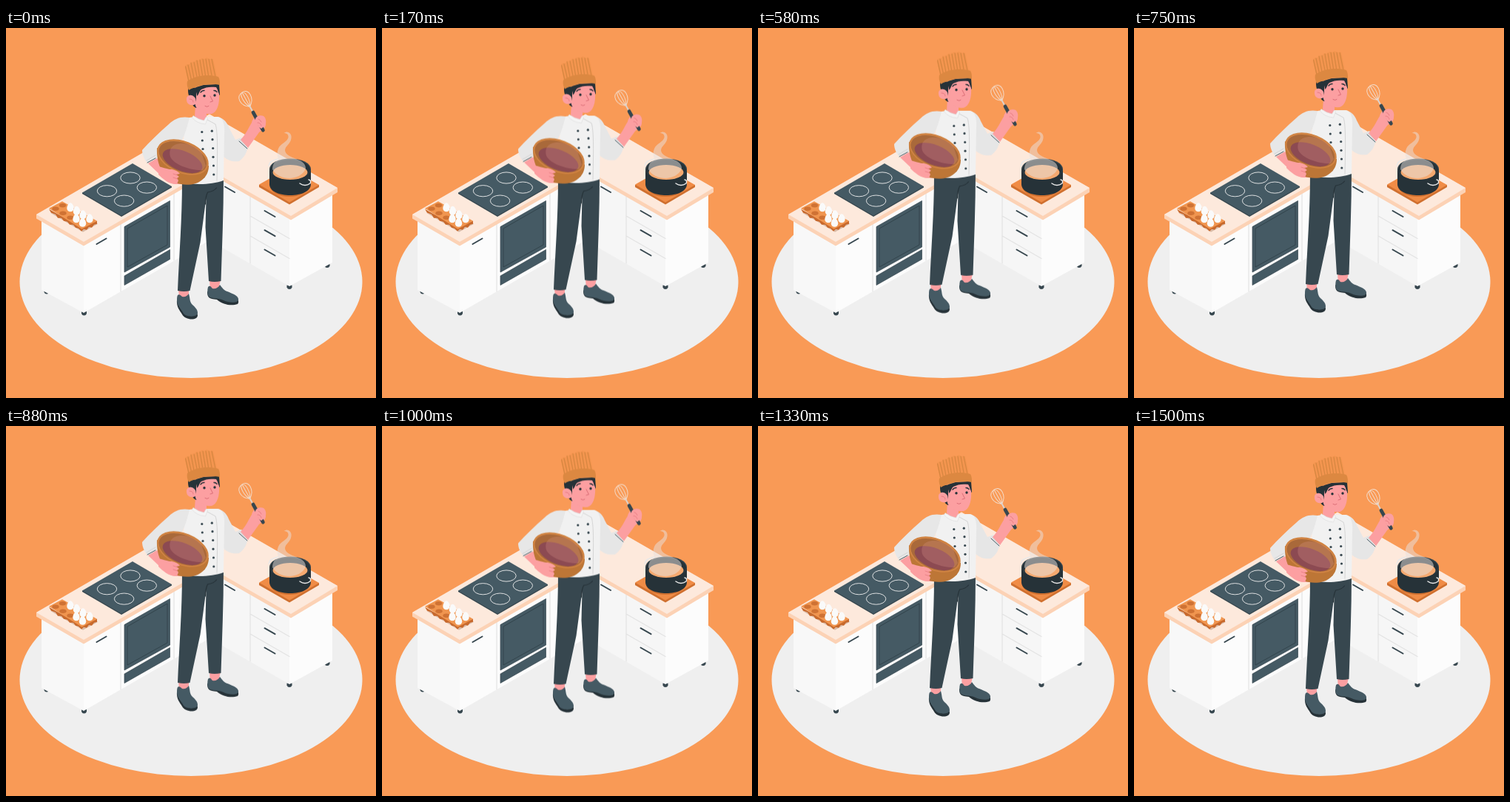
These frames come from a looping animation (500x500 px, 1.54 s). An HTML page without scripts:

```html
<!DOCTYPE html>
<html lang="en">
<head>
<meta charset="utf-8">
<title>Chef in the kitchen</title>
<style>
  html, body { margin: 0; width: 100%; height: 100%; overflow: hidden; background: #f99a56; }
  svg { display: block; width: 100vw; height: 100vh; }
  .line { fill: none; stroke-linecap: round; stroke-linejoin: round; }
  .dark { fill: #263238; }
  .slate { fill: #37474f; }
  .steel { fill: #455a64; }
  .skin { fill: #fc9fa1; }
  .handle { stroke: #37474f; stroke-width: 2; }
  .seam { stroke: #e3e3e3; stroke-width: 1.2; }
  .burner { fill: none; stroke: #f0f0f0; stroke-width: .9; }
  .fold { stroke: #d5d5d5; stroke-width: 1; }
  .chef { animation: bob 770ms cubic-bezier(.37, 0, .63, 1) -40ms infinite alternate; }
  @keyframes bob { to { transform: translateY(-9px); } }
</style>
</head>
<body>
<svg viewBox="0 0 500 500">
  <defs>
    <path id="handle" class="line handle" d="M349.500 247l14 8"/>
    <path id="foot" class="slate" d="M-3.500-2v3q1 2.500 3.500 2.500t3.500-2.500v-3z"/>
    <path id="egg" d="M0-6.500c2.500 0 4.700 4.500 4.700 7.500a4.700 4.500 0 0 1-9.400 0c0-3 2.200-7.500 4.700-7.500z" fill="#fafafa"/>
    <ellipse id="cup" rx="4.600" ry="2.700" fill="#cf7234"/>
    <ellipse id="burner" class="burner" rx="13.200" ry="7.600"/>
    <circle id="button" r="1.600" class="slate"/>
  </defs>

  <rect width="500" height="500" fill="#f99a56"/>
  <ellipse cx="250" cy="343" rx="231.500" ry="130" fill="#efefef"/>

  <g id="counters">
    <use href="#foot" x="55" y="356"/>
    <use href="#foot" x="105.500" y="385"/>
    <use href="#foot" x="383" y="349.500"/>
    <use href="#foot" x="434" y="320.500"/>

    <path d="M48 258l57 33v94l-57-31z" fill="#f8f8f8"/>
    <path d="M105 291l170-98v94l-170 98z" fill="#fcfcfc"/>
    <path d="M275 193l108 62v94l-108-62z" fill="#f6f6f6"/>
    <path d="M383 255l58-34v96l-58 32z" fill="#fcfcfc"/>

    <path class="line seam" d="M155 265v91M227 223v91M330 228v90M330 254l53 30.500M330 281l53 30.500"/>

    <g transform="translate(0 1)">
      <path d="M41 251L275 115.500 448 215v6L385 258.500 275 195.500 105 293.500 41 256.500z" fill="#fcd2b5"/>
      <path d="M41 251L275 115.500 448 215 385 253 275 190 105 288z" fill="#fde9dc"/>
    </g>

    <path class="line handle" d="M122.500 292l13-7.500M296 214.500l13 7.500"/>
    <use href="#handle"/>
    <use href="#handle" y="26.200"/>
    <use href="#handle" y="52.500"/>

    <g class="steel" stroke="#37474f" stroke-width=".7" stroke-linejoin="round">
      <path d="M160 268.500l61.500-35v62.500l-61.500 34z"/>
      <path d="M164 271l54-31v53l-54 30z" stroke="#2c3b43"/>
      <path d="M160 335l61.500-35.500v13l-61.500 35z"/>
    </g>
  </g>

  <g id="hob" transform="translate(0 .5)">
    <path class="slate" d="M103 222v1.500l53 31 68-39.500v-1.500z"/>
    <path class="steel" d="M103 222l68-39.500 53 31-68 39.500z"/>
    <use href="#burner" x="168" y="202"/>
    <use href="#burner" x="136.500" y="219.700"/>
    <use href="#burner" x="190.300" y="215.100"/>
    <use href="#burner" x="159.600" y="233.100"/>
  </g>

  <g id="eggs" transform="translate(0 .7)">
    <path d="M60 249l44 26 20-11-4-3z" fill="#d9b9a5"/>
    <path d="M58 244l44 25 21-9v4l-4 1-3 4-4-1-3 4-4-1-3 3-4-4-4-1-3-4-5 0-3-4-5-1-3-4-5 0-3-5-6-2z" fill="#c8692c"/>
    <path d="M58 243l18-9.500 47 26.500-20.500 11z" fill="#f0954f"/>
    <use href="#cup" x="67" y="243.500"/>
    <use href="#cup" x="76.500" y="239"/>
    <use href="#cup" x="77" y="249.500"/>
    <use href="#cup" x="87" y="255.500"/>
    <use href="#egg" x="87" y="242"/>
    <use href="#egg" x="95.500" y="246.500"/>
    <use href="#egg" x="104" y="252"/>
    <use href="#egg" x="113" y="257"/>
    <use href="#egg" x="95" y="257"/>
    <use href="#egg" x="103.500" y="262.500"/>
  </g>

  <g id="pot">
    <path class="line" d="M342 212v3l41 23.500 40-23.500v-3z" style="fill:#d0702f"/>
    <path d="M342 211.500l40-22.500 41 23-40 23.500z" fill="#f08c46"/>
    <ellipse cx="383" cy="214" rx="26" ry="14" fill="#d0702f"/>
    <path class="dark" d="M356 190v21c0 20 56 20 56 0v-21z"/>
    <ellipse cx="384" cy="190.500" rx="28" ry="14" fill="#37474f"/>
    <ellipse cx="384" cy="191" rx="27" ry="13" class="dark"/>
    <ellipse cx="384" cy="195" rx="23.500" ry="10" fill="#f4a970"/>
    <path class="line" d="M355 186q1-7 13-9M397 210q7 5 14 0 2-4-2-5" stroke="#e9e9e9" stroke-width="1.500"/>
    <path d="M375.500 142c5-4 11 0 10 7-1 8-8 10-8.500 16 0 6 8 9 15 12 8 3 13 6 13 13-7 17-36 17-45 1 0-8 4-11 9-13-3-5-3-10-1-15 3-7 12-9 13.500-15 .5-4-2-6-6-6z" fill="#e8e0dc" opacity=".52"/>
  </g>

  <g class="chef">
    <g id="legs">
      <path class="skin" d="M233 352h14l0 14-13-1zM275 340h15l-3 14-11 1z"/>
      <path class="dark" d="M231 367c-1 10 4 15 7 20 4 8 21 9 21 1l-2-6-23-16zM272 356c0 8 2 10 13 11 8 7 20 9 28 6 2-2 1-5 0-7z"/>
      <path class="steel" d="M232 361c2-2 4 0 6 2 4 1 7-1 9-4 2 7 1 10 4 14 4 4 8 7 8 12 0 6-15 6-19 1-3-6-9-11-9-18 0-3 0-5 1-7zM273 350c3-3 4 0 6 2 4 1 8-1 10-5 3 4 6 8 10 9 7 3 14 5 15 10 1 6-12 6-20 2-8-4-19-1-21-7-1-3-1-7 0-11z"/>
      <path class="slate" d="M238 207l56-4c0 45-2 92-3.500 139q-9 2-16.500 0l-4.500-73 1-39-8 60-14 65q-8 2-16.500 0c2-48 6-98 6-148z"/>
      <path class="line" d="M269.500 238c0-8 1-12 3-16 6-1 9-2 12-6" stroke="#263238" stroke-width="1.100"/>
    </g>

    <g id="jacket">
      <path d="M280 120c11-1 18 5 21 14l9 17 8-3 9 10c-1 10-5 17-12 22-8 1-14 0-22-7z" fill="#e6e6e6"/>
      <path d="M241 122l14-2 31 0c8 1 10 12 9 24l-1 62c-16 6-38 6-56 3l2-50z" fill="#f1f1f1"/>
      <path d="M248 121c-11-2-20 1-28 9-14 12-26 24-36 35 0 6 3 13 7 17l14-7 24-12c11-9 16-30 19-42z" fill="#e7e7e7"/>
      <path class="line fold" d="M272 124l11 6c3 9 3 30 2 76M190 179l12-7M316 151l11 10"/>
      <path class="line" d="M191 182l11-6M315 153l11 10" stroke="#455a64" stroke-width="1"/>
      <path class="skin" d="M256 104h15v18l-3 5q-7-1-13-8z"/>
      <path d="M253 118.500q7 5 14.500 6.500l3-5 2 2-3 8q-12-1-18-9z" fill="#f4f4f4" stroke="#dcdcdc" stroke-width=".6"/>
      <use href="#button" x="264.800" y="140.500"/>
      <use href="#button" x="265.300" y="152"/>
      <use href="#button" x="266" y="163.500"/>
      <use href="#button" x="278.300" y="139.200"/>
      <use href="#button" x="279" y="150.700"/>
      <use href="#button" x="279.700" y="162.500"/>
      <use href="#button" x="280" y="174.300"/>
      <use href="#button" x="280.500" y="186"/>
      <use href="#button" x="280.800" y="198"/>
      <use href="#button" x="267" y="201"/>
    </g>

    <g id="head">
      <path class="dark" d="M246 82l42-6 1 14-4 4-28 14c-6-2-6-9-8-14-3-3-3-8-3-12z"/>
      <path class="skin" d="M257 95c0-6 0-9 4-12 9-4 17-5 24-4 1 4 1 7 3 10 1 14-3 25-10 27-8 1-18-3-21-9-2-3-1-8 0-12z"/>
      <path class="skin" d="M256 95c-4-7-13-5-12 2 0 6 6 9 12 6z"/>
      <path class="dark" d="M257 80l10-3 20-1 1 11-4-7c-9-1-14 0-20 3-3 2-3 7-6 9z"/>
      <path class="line" d="M248 96q5 0 5 4" stroke="#e77c82" stroke-width="1"/>
      <path class="line" d="M276 92l3.500 7-3.500 1M269 105.500q3 2 5 0" stroke="#dc6f78" stroke-width="1"/>
      <path class="line" d="M263 87q2-3 5-2.500M281 84.500q3 0 4 2" stroke="#263238" stroke-width="1.400"/>
      <circle class="dark" cx="268" cy="91.700" r="1.700"/>
      <circle class="dark" cx="282" cy="91" r="1.700"/>
      <path d="M242 51l3-2 3 0 3-3 3 1 3-4 4 1 3-3 4 1 3-2 4 2 5 0 6 29-39 8z" fill="#f3954f"/>
      <path class="line" d="M242.500 52l4.500 20M246 50l4.500 20M250 47l4 21M254 46l4 20M258 44l3.500 21M262 43l3.500 21M266 42l3.500 22M270 42l3.500 22M274 42l4 22M278 42l5 24" stroke="#d58640" stroke-width="1.200"/>
      <path d="M245 72c11-8 28-10 42-6 2 3 2 7 2 11-15-3-29 0-42 7-2-4-3-8-2-12z" fill="#dc8841"/>
    </g>

    <g id="bowl">
      <path class="skin" d="M192 183l12-7 15 13 16 7v15c-10 1-18-5-24-10z"/>
      <path d="M204 162c-1 22 8 45 32 49 11 2 22 0 28-5 7-5 10-12 10-20z" fill="#bd7636"/>
      <g transform="rotate(22 239 174.500)">
        <ellipse cx="239" cy="174.500" rx="36.500" ry="21.500" fill="#d08342"/>
        <ellipse cx="239" cy="175" rx="34" ry="19.300" fill="#a9693a"/>
        <ellipse cx="240.500" cy="179.500" rx="28.500" ry="13.500" fill="#8c4a52"/>
      </g>
      <path d="M228 158c12-5 25 0 36 10l6 18-4 6c-16 1-39-7-44-18-2-7 0-13 6-16z" fill="#d89488" opacity=".27"/>
      <path class="skin" d="M206 187c8 2 13 4 18 4 5 1 9 3 11 6l-5 1 4 3-3 2 2 3-2 5c-10 1-19-7-25-13z"/>
      <path class="line" d="M226 197l6 2M226 202l6 2" stroke="#e77c82" stroke-width=".8"/>
    </g>

    <g id="whisk">
      <path class="skin" d="M317 151c7-7 10-15 15-23 1-5 4-8 8-9l7 1c4 3 5 9 3 14l-8 7-15 21z"/>
      <g transform="translate(334.500 115) rotate(-29)">
        <path class="line" d="M0-10C-11-17-11-31 0-32S11-17 0-10C-5-17-5-31 0-32 5-31 5-17 0-10V-32" stroke="#f3dfd0" stroke-width=".9"/>
        <path class="line" d="M0 0V-11" stroke="#dcd5d0" stroke-width="2"/>
        <path class="line" d="M0-1V26.500" stroke="#37474f" stroke-width="4.800"/>
      </g>
      <path class="skin" d="M337 123c1-4 7-6 11-4 4 3 4 9 2 13l-5 4q-4-2-5-5-4-3-3-8z"/>
      <path class="line" d="M341 123q3 1 4 4M340 128q4 0 5 4" stroke="#e77c82" stroke-width=".9"/>
    </g>
  </g>
</svg>
</body>
</html>
```
